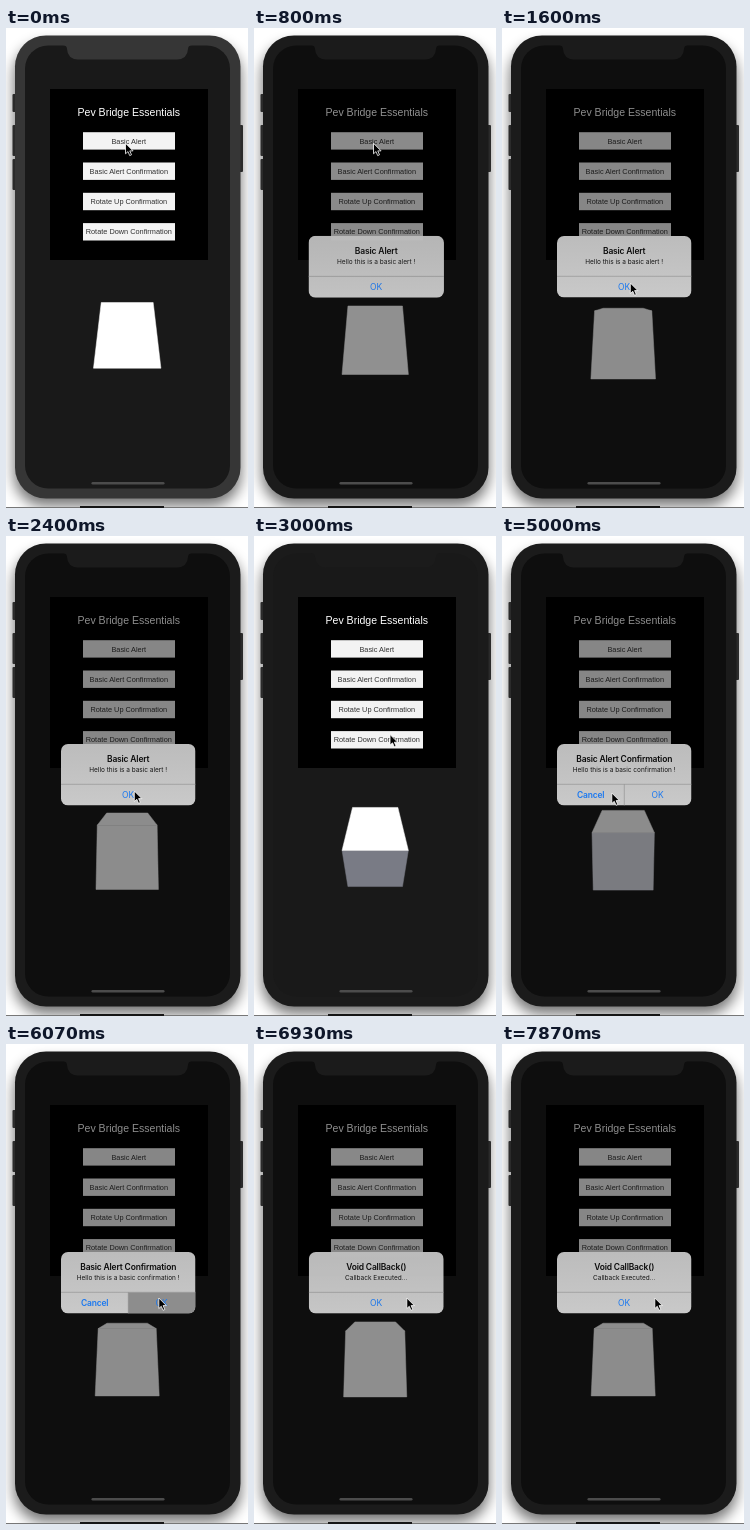
Recreate the animation shown at these times as an HTML page. Size 242 px wide and 480 px high, loop 8 s.

```html
<!DOCTYPE html>
<html lang="en">
<head>
<meta charset="utf-8">
<title>Alert demo</title>
<style>
  html, body { margin: 0; width: 100%; height: 100%; overflow: hidden; background: #fff; }
  svg { display: block; width: 100vw; height: 100vh; }
  text { text-anchor: middle; }
  .ui { font-family: "Liberation Sans", Arial, sans-serif; }
  .label { font-size: 7.35px; fill: #323232; }
  .alert { font-family: Inter, "Liberation Sans", sans-serif; }
  .heading { font-size: 8.47px; font-weight: 600; letter-spacing: -.02em; fill: #0c0c0c; }
  .message { font-size: 6.48px; fill: #141414; }
  .action { font-size: 8.47px; fill: #1a78f0; }
  .bold { font-weight: 600; letter-spacing: -.02em; }
  .rule { stroke: #8c8c8c; stroke-width: .6; }
</style>
</head>
<body>
<svg viewBox="0 0 242 480">
  <defs>
    <filter id="blur" x="-20%" y="-20%" width="140%" height="140%"><feGaussianBlur stdDeviation="7"/></filter>
    <clipPath id="screenClip"><rect x="19" y="17.5" width="205" height="443" rx="23"/></clipPath>
    <clipPath id="alertClip"><rect x="55" y="208" width="134.5" height="61.5" rx="7"/></clipPath>
    <linearGradient id="sheet" x2="0" y2="1">
      <stop offset="0" stop-color="#bcbcbc"/>
      <stop offset="1" stop-color="#c9c9c9"/>
    </linearGradient>
  </defs>

  <rect x="8" y="16" width="227" height="462" rx="31" opacity=".55" filter="url(#blur)"/>
  <rect y="479" width="242" height="1" fill="#777"/>
  <rect x="74" y="478" width="84" height="2" fill="#161616"/>

  <g fill="#2b2b2b">
    <rect x="6.5" y="66" width="4" height="18" rx="1"/>
    <rect x="6.5" y="97" width="4" height="31" rx="1"/>
    <rect x="6.5" y="131" width="4" height="31" rx="1"/>
    <rect x="233" y="97" width="4" height="47" rx="1"/>
  </g>
  <rect class="bezel" x="9" y="7.5" width="225.5" height="463" rx="31"/>

  <g clip-path="url(#screenClip)">
    <rect x="19" y="17" width="205" height="444" fill="#191919"/>
    <rect x="44" y="61" width="158" height="171"/>
    <text class="ui" x="122.8" y="87.8" font-size="10.55" fill="#fff">Pev Bridge Essentials</text>
    <g id="buttons" class="ui"></g>
    <g id="cube"></g>
    <rect id="dim" x="19" y="17" width="205" height="444"/>
  </g>
  <path class="bezel" d="M57 17Q61 17.500 61 21Q61.500 31 72 31.500H171Q181.500 31 182 21Q182 17.500 186 17Z"/>
  <rect x="85.500" y="454" width="73" height="2.500" rx="1.250" fill="#4c4c4c"/>

  <g id="alert" class="alert">
    <g clip-path="url(#alertClip)">
      <rect x="55" y="208" width="134.5" height="61.5" fill="url(#sheet)"/>
      <rect id="pressed" y="248.5" height="21" fill="#8d8d8d"/>
    </g>
    <path class="rule" d="M55 248.300H189.500"/>
    <g id="content">
      <text id="heading" class="heading" x="122.2" y="226"/>
      <text id="message" class="message" x="122.2" y="236"/>
      <text id="single" class="action" x="122.2" y="262.2">OK</text>
      <g id="pair">
        <path class="rule" d="M122.300 248.300V269.500"/>
        <text class="action bold" x="88.6" y="262.2">Cancel</text>
        <text class="action" x="155.6" y="262.2">OK</text>
      </g>
    </g>
  </g>

  <path id="cursor" d="M0 0V10.500L2.500 8.300L4.200 12.300L6 11.500L4.300 7.600H7.600Z"
        stroke="#fff" stroke-width=".8" stroke-linejoin="round"/>
</svg>
<script>
const LOOP = 8000;
const $ = id => document.getElementById(id);
const clamp = (v, lo, hi) => Math.min(hi, Math.max(lo, v));
const ramp = (t, from, to) => clamp((t - from) / (to - from), 0, 1);
const gray = v => `rgb(${v},${v},${v})`;

function add(parent, tag, attrs, text = '') {
  const el = document.createElementNS('http://www.w3.org/2000/svg', tag);
  for (const key in attrs) el.setAttribute(key, attrs[key]);
  el.textContent = text;
  return parent.appendChild(el);
}

const labels = ['Basic Alert', 'Basic Alert Confirmation', 'Rotate Up Confirmation', 'Rotate Down Confirmation'];
const buttons = labels.map((label, i) => {
  const y = 104.2 + i * 30.3;
  const box = add($('buttons'), 'rect', { x: 77, y, width: 92, height: 17.4, fill: gray(243) });
  add($('buttons'), 'text', { class: 'label', x: 122.8, y: y + 11.3 }, label);
  return box;
});
const presses = [[470, 600], [3400, 3530]];

const alerts = [
  { open: 607, press: 2440, close: 2600, heading: 'Basic Alert', message: 'Hello this is a basic alert !' },
  { open: 3574, press: 5960, close: 6190, heading: 'Basic Alert Confirmation',
    message: 'Hello this is a basic confirmation !', pair: true },
  { open: 6700, press: LOOP, close: LOOP, heading: 'Void CallBack()', message: 'Callback Executed...' }
];

// time, x, y of the pointer tip
const path = [
  [0, 119.5, 115.3], [850, 119.5, 115.3], [1450, 128.3, 255], [2750, 128.3, 255],
  [3250, 143.7, 142.8], [3750, 143.7, 142.8], [4150, 154, 255], [4450, 154, 255],
  [4900, 109.8, 257], [5150, 109.8, 257], [5600, 152.8, 254], [LOOP, 152.8, 254]
];

// Critically damped spring, 0 to 1
function settle(dt) {
  const x = Math.max(0, dt) * 0.0267;
  return 1 - (1 + x) * Math.exp(-x);
}

function drawCursor(t) {
  const i = path.findIndex(p => p[0] > t);
  const [t0, x0, y0] = path[i - 1], [t1, x1, y1] = path[i];
  const u = ramp(t, t0, t1), e = u * u * (3 - 2 * u);
  $('cursor').setAttribute('transform', `translate(${x0 + (x1 - x0) * e} ${y0 + (y1 - y0) * e})`);
}

function drawBezel(t) {
  const color = gray(54 - 27 * ramp(t, 40, 330));
  document.querySelectorAll('.bezel').forEach(el => el.setAttribute('fill', color));
}

function drawButtons(t) {
  presses.forEach(([down, up], i) => {
    const held = ramp(t, down, down + 100) - ramp(t, up, up + 100);
    buttons[i].setAttribute('fill', gray(243 - 48 * held));
  });
}

const faces = [0, 1, 2, 3].map(() => add($('cube'), 'path', { 'stroke-width': 0.5 }));

// Perspective view of an edge parallel to x, at (y, z) from the cube's centre
function projectEdge(y, z) {
  const scale = 130 / (2.625 + z);
  return { y: 239 + (1.38 + y) * scale, half: scale / 2 };
}

function drawCube(t) {
  faces.forEach((face, k) => {
    const tilt = (35 + t * 0.1 + 90 * k + 180) % 360 - 180;
    const c = Math.cos(tilt * Math.PI / 180) / 2, s = Math.sin(tilt * Math.PI / 180) / 2;
    const a = projectEdge(-c - s, s - c), b = projectEdge(c - s, -c - s);
    const visible = b.y > a.y, cx = 121.2;
    face.style.display = visible ? '' : 'none';
    if (!visible) return;
    const v = clamp(200 + (tilt + 9) * 5, 115, 255);
    const color = `rgb(${v},${Math.min(255, v + 2)},${Math.min(255, v + 12)})`;
    face.setAttribute('fill', color);
    face.setAttribute('stroke', color);
    face.setAttribute('d', `M${cx - a.half} ${a.y}H${cx + a.half}L${cx + b.half} ${b.y}H${cx - b.half}Z`);
  });
}

function drawAlert(t) {
  const current = alerts.filter(a => t >= a.open).pop();
  const shown = current ? settle(t - current.open) * (1 - settle(t - current.close)) : 0;
  $('dim').setAttribute('opacity', 0.45 * shown);
  $('alert').setAttribute('opacity', shown);
  $('content').setAttribute('opacity', shown);
  if (!current) return;
  const scale = 1.2 - 0.2 * settle(t - current.open);
  $('alert').setAttribute('transform', `translate(122.25 238.75) scale(${scale}) translate(-122.25 -238.75)`);
  $('heading').textContent = current.heading;
  $('message').textContent = current.message;
  $('single').style.display = current.pair ? 'none' : '';
  $('pair').style.display = current.pair ? '' : 'none';
  const left = current.pair ? 122.3 : 55;
  $('pressed').setAttribute('x', left);
  $('pressed').setAttribute('width', 189.5 - left);
  $('pressed').setAttribute('opacity', t >= current.press && t < current.close + 60 ? 1 : 0);
}

const start = performance.now();
function frame() {
  const t = (performance.now() - start) % LOOP;
  drawBezel(t);
  drawButtons(t);
  drawCube(t);
  drawAlert(t);
  drawCursor(t);
  requestAnimationFrame(frame);
}
frame();
</script>
</body>
</html>
```
